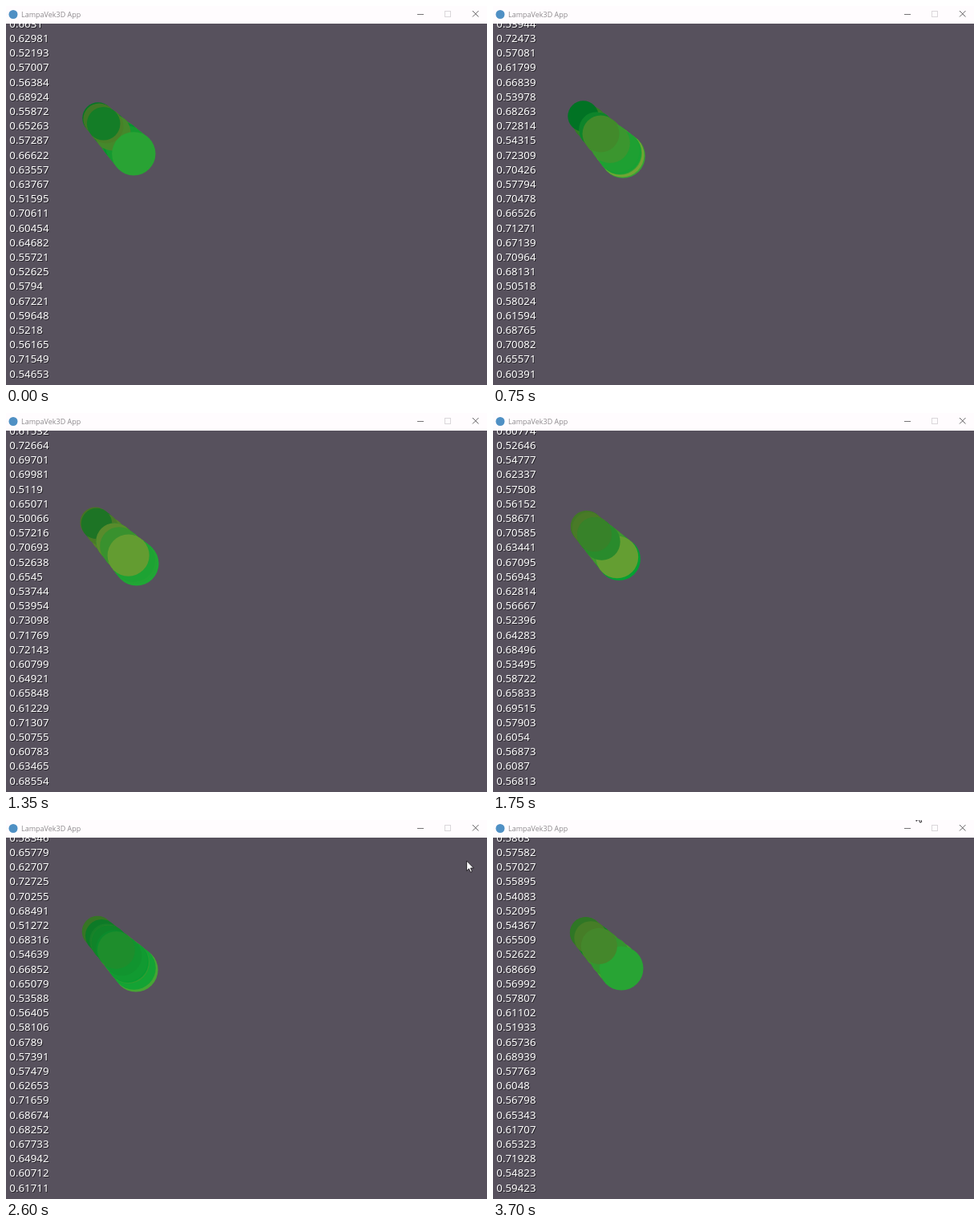
An HTML page with a canvas that plays this animation: 600x473 px, repeating every 3.75 s.

```html
<!DOCTYPE html>
<html lang="en">
<head>
<meta charset="utf-8">
<title>LampaVek3D App</title>
<style>
html, body { margin: 0; width: 600px; height: 473px; overflow: hidden; background: #57515d; }
canvas { display: block; }
</style>
</head>
<body>
<canvas id="stage" width="600" height="473"></canvas>
<script>
const ctx = document.getElementById('stage').getContext('2d');
const LOOP = 3750, STEP = 50, ROWS = 25;

function rng(seed) {
  return () => {
    seed = (seed + 0x6D2B79F5) | 0;
    let t = Math.imul(seed ^ (seed >>> 15), 1 | seed);
    t = (t + Math.imul(t ^ (t >>> 7), 61 | t)) ^ t;
    return ((t ^ (t >>> 14)) >>> 0) / 4294967296;
  };
}

// Each reading is the logistic function of a uniform random number.
function sample(n) {
  const rand = rng(n * 7919 + 17);
  return Array.from({ length: ROWS }, () => ({
    v: Math.round(1e5 / (1 + Math.exp(-rand()))) / 1e5,
    red: rand()
  }));
}

function disc(x, y, r, fill) {
  ctx.fillStyle = fill;
  ctx.beginPath();
  ctx.arc(x, y, r, 0, Math.PI * 2);
  ctx.fill();
}

// The reading sets place along the diagonal, size and brightness.
function blob({ v, red }) {
  disc(222.7 * v, 222.7 * v + 25, 38 * v, `rgb(${160 * v * red},${228 * v},${72 * v})`);
}

function readings(list) {
  ctx.font = '500 13.3px "Noto Sans", sans-serif';
  list.forEach(({ v }, i) => {
    const y = 26.7 + i * 18.2;
    ctx.fillStyle = 'rgba(0,0,0,.55)';
    ctx.fillText(v, 5.3, y + 1);
    ctx.fillStyle = '#fff';
    ctx.fillText(v, 4.3, y);
  });
}

function line(color, x1, y1, x2, y2) {
  ctx.strokeStyle = color;
  ctx.beginPath();
  ctx.moveTo(x1, y1);
  ctx.lineTo(x2, y2);
  ctx.stroke();
}

function titleBar() {
  ctx.fillStyle = '#fffcfe';
  ctx.fillRect(0, 0, 600, 22);
  disc(9, 10.5, 5.5, '#4f90c4');
  ctx.font = '9px "Open Sans", sans-serif';
  ctx.fillStyle = '#8c898c';
  ctx.fillText('LampaVek3D App', 19, 13.5);
  ctx.lineWidth = 1;
  line('#767476', 513, 10.5, 521, 10.5);
  ctx.strokeStyle = '#dad7da';
  ctx.strokeRect(547.5, 6.5, 7, 7);
  line('#656365', 582, 6, 589.5, 13.5);
  line('#656365', 589.5, 6, 582, 13.5);
}

const arrow = new Path2D('M0 0V12.5L2.8 9.8L4.8 14.2L6.8 13.3L4.9 9H8.8Z');

// Enters at the right edge and glides out over the title bar, leaving its tail in view.
function pointer(t) {
  if (t < 2400) return;
  const f = Math.min(1, (t - 2400) / 600);
  ctx.save();
  ctx.translate(598 - 70 * f, 82 - 93 * f);
  ctx.fillStyle = '#fff';
  ctx.strokeStyle = '#171419';
  ctx.lineWidth = .9;
  ctx.fill(arrow);
  ctx.stroke(arrow);
  ctx.restore();
}

function draw(n) {
  const list = sample(n);
  ctx.fillStyle = '#57515d';
  ctx.fillRect(0, 0, 600, 473);
  list.forEach(blob);
  readings(list);
  titleBar();
  pointer(n * STEP);
}

const start = performance.now();
let shown = -1;

function tick() {
  const n = Math.floor((performance.now() - start) % LOOP / STEP);
  if (n !== shown) draw(shown = n);
  requestAnimationFrame(tick);
}
tick();
</script>
</body>
</html>
```
